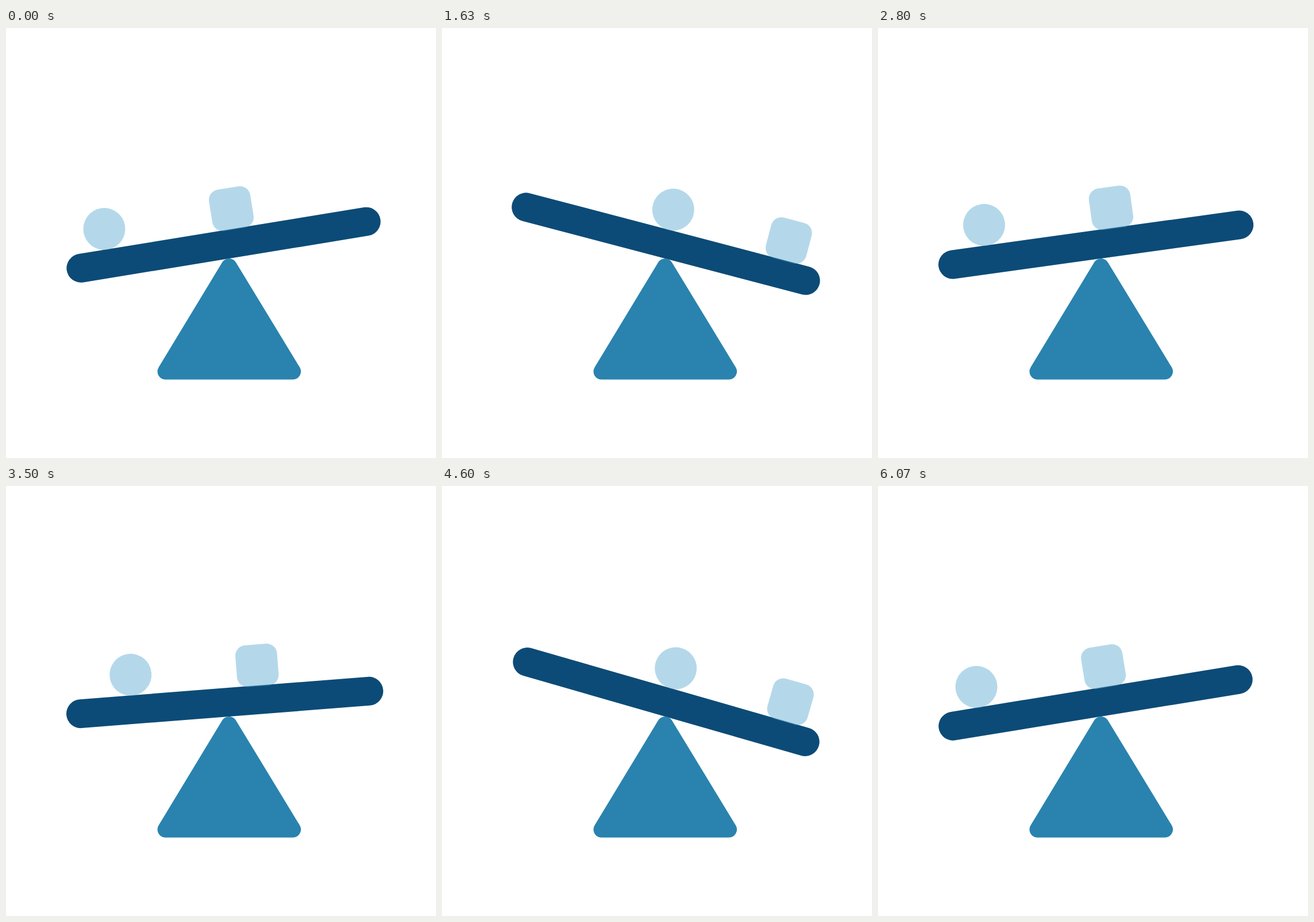
Animation of 748x748 px, one loop 6110 ms. Source, as an HTML page:

```html
<!DOCTYPE html>
<html lang="en">
<head>
<meta charset="utf-8">
<title>Seesaw</title>
<style>
  html, body { margin: 0; width: 100%; height: 100%; overflow: hidden; background: #fff; }
  svg { display: block; width: 100%; height: 100%; }
</style>
</head>
<body>
<svg viewBox="0 0 748 748">
  <g id="seesaw">
    <rect x="-281.8" y="-51" width="552.8" height="50" rx="25" fill="#0c4b77"/>
    <g fill="#6bb1d5" fill-opacity=".5">
      <circle id="ball" cy="-86.8" r="36.5"/>
      <rect id="box" y="-122.3" width="72.6" height="72.6" rx="18"/>
    </g>
  </g>
  <path d="M388 415L499 597.5H277.5Z" fill="#2983ae" stroke="#2983ae" stroke-width="28" stroke-linejoin="round"/>
</svg>
<script>
const LOOP = 6110, SWING = LOOP / 4, LEAD = 10;
const EASE_IN = 430, EASE_OUT = 85, SPEED = 0.02; // ms, ms, degrees per ms
const seesaw = document.getElementById('seesaw');
const ball = document.getElementById('ball');
const box = document.getElementById('box');

// Soft start at the low end, steady tilt, short stop at the high end.
function tilt(t) {
  const rampIn = t < EASE_IN ? t * t / (2 * EASE_IN) : t - EASE_IN / 2;
  const late = Math.max(0, t - (SWING - EASE_OUT));
  return -9.28 + SPEED * (rampIn - late * late / (2 * EASE_OUT));
}

function draw(ms) {
  const t = (ms + LEAD) % (2 * SWING);
  const swing = t < SWING ? t : 2 * SWING - t;
  const slide = (1 - Math.cos(Math.PI * swing / SWING)) / 2;
  seesaw.setAttribute('transform', `translate(388 402) rotate(${tilt(swing)})`);
  ball.setAttribute('cx', -205.8 + 200.4 * slide);
  box.setAttribute('x', 18 + 184.4 * slide - 36.3);
}

let start;
function tick(now) {
  start ??= now;
  draw((now - start) % LOOP);
  requestAnimationFrame(tick);
}
draw(0);
requestAnimationFrame(tick);
</script>
</body>
</html>
```
